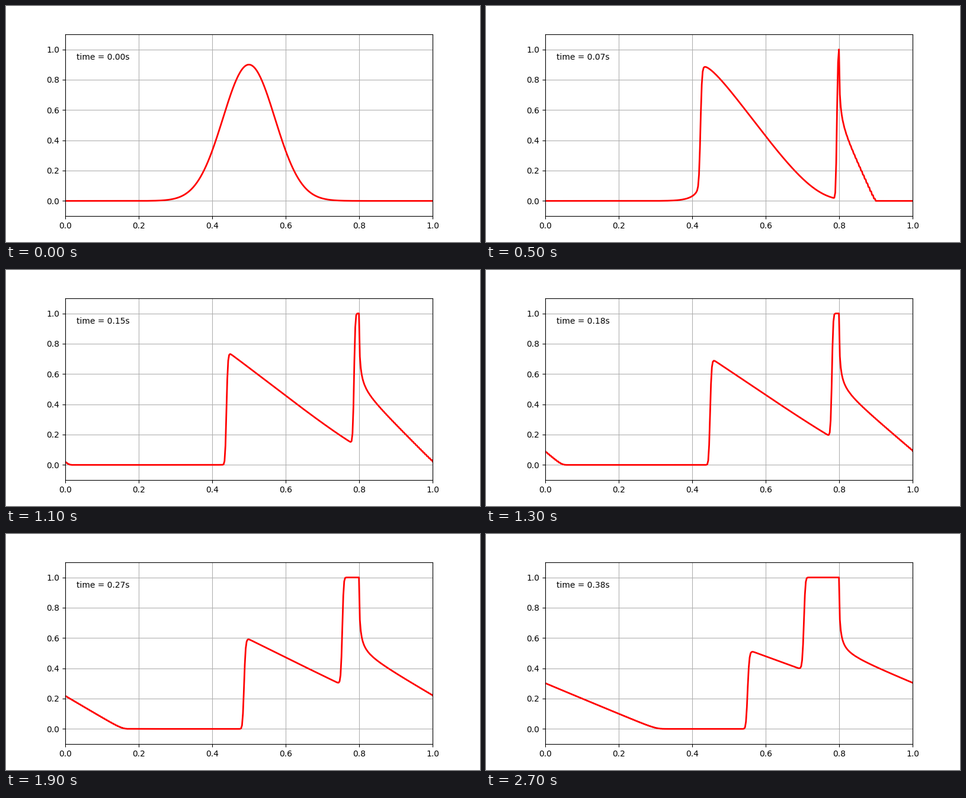
These frames come from a looping animation (800x400 px, 2800 ms). A matplotlib script:

```python
import matplotlib.pyplot as plt
import numpy as np
from matplotlib.animation import FuncAnimation

FRAMES = 28
STEPS = 8           # solver steps per picture
DT = 0.014 / STEPS
VMAX = 1.3
CELLS = 400
LIGHT = 319         # cell held at full density

x = np.linspace(0, 1, CELLS)
dx = x[1] - x[0]


def flux(u):
    return VMAX * u * (1 - u)


def step(u):
    """One Lax-Friedrichs step on a ring, blocked at the light."""
    left, right = np.roll(u, 1), np.roll(u, -1)
    new = (left + right) / 2 - DT / (2 * dx) * (flux(right) - flux(left))
    new[LIGHT] = 1
    return new


def solve():
    u = 0.9 * np.exp(-100 * (x - 0.5) ** 2)
    states = [u]
    for _ in range(FRAMES - 1):
        for _ in range(STEPS):
            u = step(u)
        states.append(u)
    return states


states = solve()

fig, ax = plt.subplots(figsize=(8, 4), dpi=100)
ax.set_xlim(0, 1)
ax.set_ylim(-0.1, 1.1)
ax.grid()
line, = ax.plot(x, states[0], color="red", lw=2)
label = ax.text(0.03, 0.86, "", transform=ax.transAxes)


def draw(i):
    line.set_ydata(states[i])
    label.set_text(f"time = {i * STEPS * DT:.2f}s")
    return line, label


anim = FuncAnimation(fig, draw, frames=FRAMES, interval=100,
                     repeat=True, repeat_delay=0)
plt.show()
```
